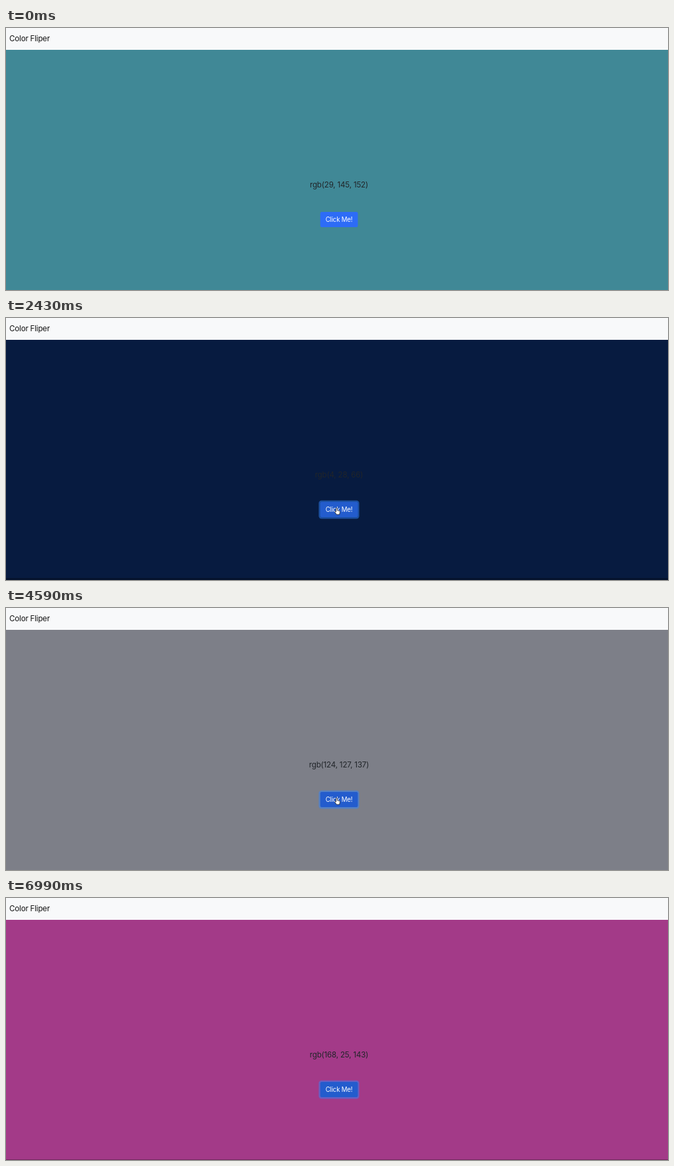
These frames come from a looping animation (1000 by 396 pixels, 7.09 s). An HTML page:

```html
<!DOCTYPE html>
<html lang="en">
<head>
<meta charset="utf-8">
<title>Color Fliper</title>
<style>
  html, body { margin: 0; width: 100%; height: 100%; overflow: hidden; }
  svg { display: block; width: 100%; height: 100%; }
  text { font: 11.6px Inter, Roboto, sans-serif; letter-spacing: -.2px; }
  .middle { text-anchor: middle; }
  .label { font-size: 9.7px; fill: #fff; }
</style>
</head>
<body>
<svg viewBox="0 0 1000 396">
  <rect id="page" width="1000" height="396"/>
  <rect id="edge" width="1000" fill="#000" opacity=".3"/>
  <rect width="1000" height="33" fill="#f8f9fa"/>
  <text x="5" y="20" fill="#111">Color Fliper</text>
  <text id="value" class="middle" x="503" y="241" fill="#212529"></text>
  <rect id="ring" x="472.4" y="275.8" width="61.2" height="27.6" rx="4.2" fill="#3184fd" opacity=".5"/>
  <rect id="button" x="474.7" y="278" width="56.8" height="23" rx="2.2"/>
  <text class="label middle" x="503" y="293">Click Me!</text>
  <g id="cursor" stroke-linejoin="round">
    <path id="arrow" d="M0 0V9.5L2.2 7.5L3.7 11L5.3 10.3L3.8 7H6.8Z" fill="#000" stroke="#fff" stroke-width=".8"/>
    <path id="hand" d="M-.9 .8Q0 -.5 .9 .8V3.8L4 4.6Q5.2 5 4.9 6.8L4.2 10H-.2L-2.7 6.3Q-2.8 5 -1.6 5.4L-.9 6Z" fill="#fff" stroke="#222" stroke-width=".8"/>
  </g>
</svg>
<script>
const LOOP = 7090;

// start time, displayed background, label, height of the dark bottom edge
const steps = [
  [0, '#408896', 'rgb(29, 145, 152)', 0],
  [860, '#7e9a82', 'rgb(118, 158, 127)', 0],
  [1270, '#8d8ab9', 'rgb(142, 133, 191)', 0],
  [2320, '#071b40', 'rgb(4, 28, 66)', 3],
  [3090, '#e4ef94', 'rgb(224, 249, 132)', 0],
  [3830, '#c59e7a', 'rgb(200, 155, 116)', 0],
  [4480, '#7d7f88', 'rgb(124, 127, 137)', 0],
  [4940, '#2e16d4', 'rgb(51, 2, 223)', 1],
  [5650, '#a33a88', 'rgb(168, 25, 143)', 1]
];

const el = id => document.getElementById(id);
const set = (id, name, value) => el(id).setAttribute(name, value);
const show = (id, on) => set(id, 'visibility', on ? 'visible' : 'hidden');
const ease = p => p * p * (3 - 2 * p);

// Progress from 0 to 1, advancing in eight held poses.
const stepped = (t, from, to) =>
  Math.max(0, Math.min(7, Math.floor((t - from) / (to - from) * 7))) / 7;

function cursorPosition(t) {
  const away = t < 860
    ? 1 - ease(stepped(t, 110, 790))
    : ease(stepped(t, 6100, 6710));
  return [499.5 + 8 * away, 287 + 76 * away];
}

function draw(t) {
  const [, color, label, edge] = steps.findLast(step => step[0] <= t);
  set('page', 'fill', color);
  set('edge', 'y', 396 - edge);
  set('edge', 'height', edge);
  el('value').textContent = label;

  const [x, y] = cursorPosition(t);
  const hover = y < 301;
  const focused = t >= 790;
  set('button', 'fill', focused || t >= 110 && hover ? '#235ccd' : '#2d6cf6');
  show('ring', focused);

  const visible = t >= 110 && t < 6710 && !(t >= 5050 && t < 5250);
  set('cursor', 'transform', `translate(${x} ${y})`);
  show('hand', visible && hover);
  show('arrow', visible && !hover);
}

const start = performance.now();
function tick() {
  draw((performance.now() - start) % LOOP);
  requestAnimationFrame(tick);
}
tick();
</script>
</body>
</html>
```
